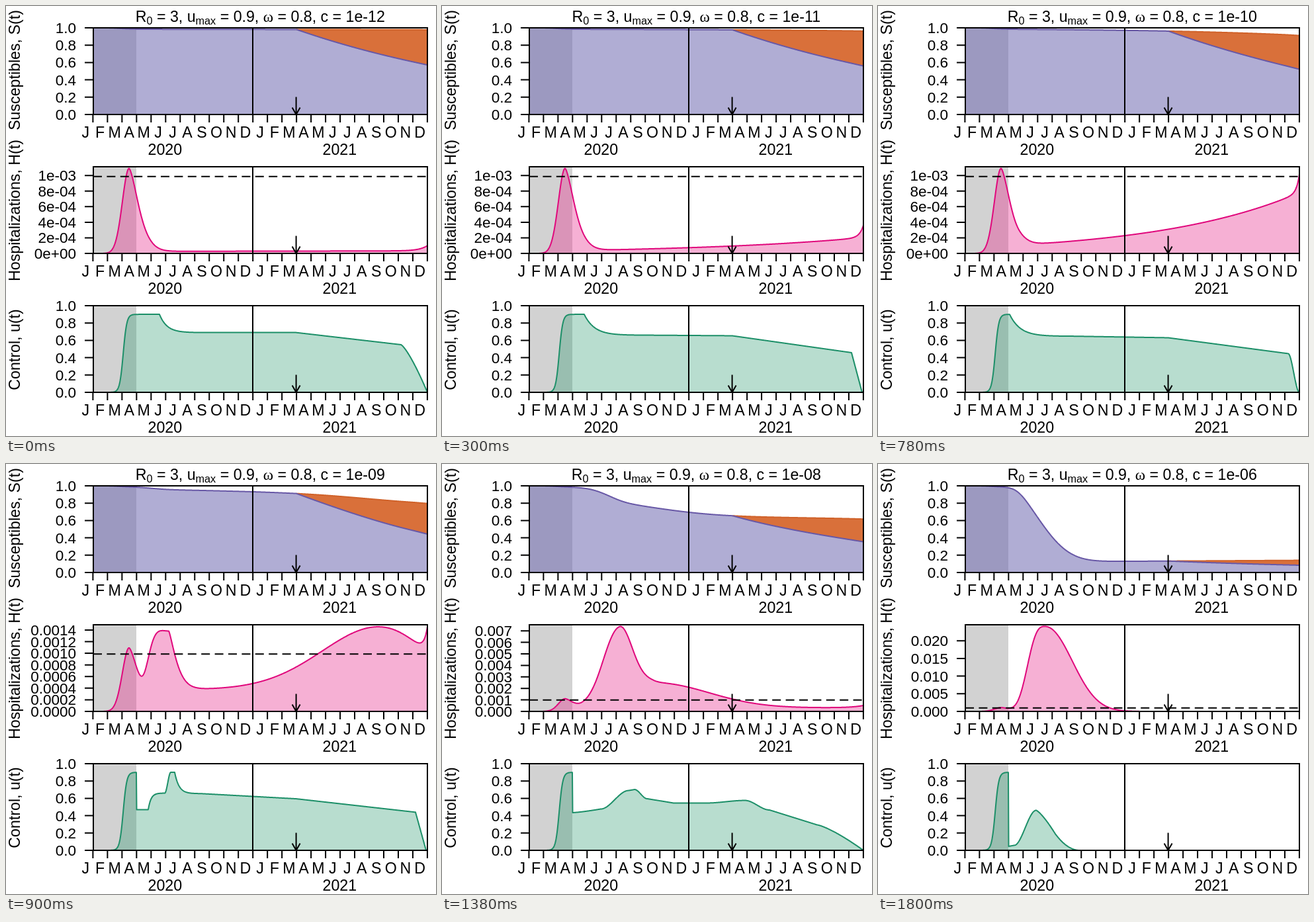
Write an HTML page that moves like this. It is 650 px wide and 650 px high and loops after 2100 ms.

```html
<!DOCTYPE html>
<html lang="en">
<head>
<meta charset="utf-8">
<title>Epidemic control by cost</title>
<style>
  html, body { margin: 0; width: 100%; height: 100%; overflow: hidden; background: #fff; }
  svg { display: block; width: 650px; height: 650px; }
  text { font: 23.2px "Liberation Sans", Arial, sans-serif; text-anchor: middle; }
  .tick { font-size: 22.5px; text-anchor: end; }
  .sub { font-size: 16.2px; }
  .greek { font-family: "Liberation Serif", Times, serif; }
  .ink { fill: none; stroke: #000; stroke-width: 2; }
  .curve { fill: none; stroke-width: 2; stroke-linejoin: round; }
</style>
</head>
<body>
<svg id="stage" viewBox="0 0 650 650"></svg>
<script>
// Time runs along x in stage pixels.
const LEFT = 132, RIGHT = 637, HEIGHT = 131, MONTH = 21.98;
const LOCKDOWN_END = 197, NEW_YEAR = 373, VACCINE = 438.6;
const STEP_MS = 300, DX = 0.5;
const stage = document.getElementById('stage');

// Hospitalizations are in thousandths; unit is the pixels for one thousandth.
// floor and tip: [size, growth length]; bumps: [centre, size, left width, left power, right width, right power].
// control: [x, value, ease from the previous key].
const scenes = [
  { unit: 117.75, step: 0.2, ticks: 6,
    floor: [0.03, 2000], tip: [0.068, 12], bumps: [],
    control: [[232, 0.9], [300, 0.69, 'settle'], [VACCINE, 0.69], [597, 0.55], [637, 0, 'enter']] },
  { unit: 117.75, step: 0.2, ticks: 6,
    floor: [0.095, 260], tip: [0.16, 6], bumps: [],
    control: [[215, 0.9], [308, 0.66, 'settle'], [VACCINE, 0.653], [619, 0.458], [635, 0]] },
  { unit: 117.75, step: 0.2, ticks: 6,
    floor: [0.31, 215], tip: [0.238, 4.4], bumps: [],
    control: [[199, 0.9], [295, 0.648, 'settle'], [VACCINE, 0.63], [620, 0.447], [637, 0, 'smooth']] },
  { unit: 87.9, step: 0.2, ticks: 8,
    floor: [0.375, 1e5], tip: [0.444, 5.5],
    bumps: [[246, 1, 33, 4.4, 15.3, 1.3], [562, 1.08, 122, 1.93, 101, 2.15]],
    control: [[197, 0.9], [197.4, 0.47], [215, 0.47], [240, 0.66, 'settle'], [249, 0.9, 'smooth'], [255, 0.9],
      [294, 0.655, 'settle'], [VACCINE, 0.595], [619, 0.44], [635, 0]] },
  { unit: 17.4, step: 1, ticks: 8,
    floor: [0.316, 1e5], tip: [0.2, 18],
    bumps: [[268, 6.64, 34.2, 2.1, 28, 2], [320, 2.18, 40, 2, 116, 2.05]],
    control: [[197, 0.9], [197.4, 0.435], [240, 0.477, 'enter'], [282, 0.69, 'smooth'], [291, 0.702],
      [310, 0.596, 'smooth'], [350, 0.546], [400, 0.546], [458, 0.576, 'smooth'], [495, 0.466, 'smooth'],
      [567, 0.294], [637, 0, 'enter']] },
  { unit: 9.87, step: 2, ticks: 7,
    floor: [0, 1], tip: [0, 1],
    bumps: [[277, 12.92, 38.3, 2.07, 56, 1.35], [465, 2.08, 110, 2, 90, 1.83]],
    control: [[197, 0.9], [197.4, 0.43], [250, 0.43], [274, 0.55, 'leave'], [294, 0.626, 'enter'],
      [315, 0.496, 'leave'], [345, 0.454, 'enter'], [390, 0.294, 'enter'], [515, 0, 'leave']] },
  { unit: 5.34, step: 5, ticks: 5,
    floor: [0, 1], tip: [0, 1],
    bumps: [[252, 24.06, 30.8, 2.8, 56.8, 2.1]],
    control: [[197, 0.9], [197.4, 0.046], [206, 0.058], [239, 0.462, 'smooth'], [268, 0.19, 'enter'], [305, 0, 'leave']] }
];

const eases = {
  line: t => t,
  enter: t => t ** 1.3,
  leave: t => 1 - (1 - t) ** 2,
  smooth: t => t * t * (3 - 2 * t),
  settle: t => (1 - Math.exp(-6 * t)) / (1 - Math.exp(-6))
};
const logistic = z => 1 / (1 + Math.exp(-z));

function bump(x, [centre, size, wl, pl, wr, pr]) {
  const d = x - centre;
  return size * Math.exp(-(d < 0 ? (-d / wl) ** pl : (d / wr) ** pr));
}

// The first wave is common to all runs.
const firstWave = [186, 1.091, 14.4, 1.95, 20.8, 1.55];

function hospital(x, { floor, tip, bumps }) {
  const base = floor[0] * Math.exp((x - VACCINE) / floor[1]) * logistic((x - 212) / 5);
  const end = tip[0] * Math.exp((x - RIGHT) / tip[1]);
  return [firstWave, ...bumps].reduce((sum, b) => sum + bump(x, b), base + end);
}

function control(x, { control: keys }) {
  const i = keys.findIndex(k => k[0] >= x);
  if (i < 0) return 0;
  if (!i) return 0.9 * logistic((x - 177.2) / 2.7);
  const [x0, v0] = keys[i - 1], [x1, v1, ease = 'line'] = keys[i];
  return v0 + (v1 - v0) * eases[ease]((x - x0) / (x1 - x0));
}

// Infections precede hospital stays; vaccination moves people from s to v.
function population(scene) {
  const infection = 0.00046, lag = 15, waning = 0.00005, vaccination = 0.0027;
  const rows = [];
  let s = 1, v = 0;
  for (let x = LEFT; x <= RIGHT; x += DX) {
    rows.push({ x, s, all: s + v });
    const dose = x < VACCINE ? 0 : vaccination * s;
    const ill = infection * hospital(Math.min(x + lag, RIGHT), scene);
    s += (waning * (1 - s - v) - ill - dose) * DX;
    v += dose * DX;
  }
  return rows;
}

const path = points => 'M' + points.map(([x, y]) => `${x} ${y.toFixed(2)}`).join('L');

function plot(f, base, scale) {
  const points = [];
  for (let x = LEFT; x <= RIGHT; x += DX) points.push([x, base - scale * f(x)]);
  return path(points);
}

const text = (x, y, s, extra = '') => `<text x="${x}" y="${y}" ${extra}>${s}</text>`;
const ink = (d, extra = '') => `<path class="ink" d="${d}" ${extra}/>`;
const line = (d, color) => `<path class="curve" d="${d}" stroke="${color}"/>`;
const area = (d, base, color, alpha) =>
  `<path d="${d}L${RIGHT} ${base}H${LEFT}Z" fill="${color}" fill-opacity="${alpha}"/>`;
const shade = base =>
  `<rect x="${LEFT}" y="${base - HEIGHT}" width="${LOCKDOWN_END - LEFT}" height="${HEIGHT}" fill="#d2d2d2"/>`;

// Box, axes, labels, year divider and arrow of one panel.
function frame(base, name, nameY, { ticks, gap, label }) {
  const top = base - HEIGHT;
  let d = `M${LEFT} ${top}H${RIGHT}V${base}H${LEFT}ZM${NEW_YEAR} ${top}V${base}`;
  d += `M${VACCINE} ${base - 26.5}V${base}m-6 -10.5l6 10.5l6 -10.5`;
  let out = '';
  for (let i = 0; i < 24; i++) {
    const x = LEFT - 0.6 + i * MONTH;
    d += `M${x} ${base}v12`;
    out += text(x - 11.2, base + 35, 'JFMAMJJASOND'[i % 12]);
  }
  for (let i = 0; i < ticks; i++) {
    const y = base - i * gap;
    d += `M${LEFT} ${y}h-13`;
    out += text(106, y + 8, label(i), 'class="tick"');
  }
  out += text(240.3, base + 61, '2020') + text(504.3, base + 61, '2021');
  out += text(0, 0, name, `transform="translate(21 ${nameY}) rotate(-90)"`);
  return ink(d) + out;
}

function title(cost) {
  const sub = s => `<tspan class="sub" dy="4">${s}</tspan><tspan dy="-4"> = </tspan>`;
  return text(384.3, 24, `R${sub('0')}3, u${sub('max')}0.9, <tspan class="greek">ω</tspan> = 0.8, c = ${cost}`);
}

// Exponent form with two digits, such as 2e-04.
const sci = v => v.toExponential(0).replace(/(\d)$/, '0$1');

function draw(scene, index) {
  const { unit, step, ticks } = scene;
  const shareAxis = { ticks: 6, gap: HEIGHT / 5, label: i => (i / 5).toFixed(1) };
  const hospitalAxis = {
    ticks, gap: step * unit,
    label: i => unit > 100 ? sci(i * step / 1000) : (i * step / 1000).toFixed(step < 1 ? 4 : 3)
  };
  const share = v => 164 - HEIGHT * v;
  const rows = population(scene), vaccinated = rows.filter(r => r.x >= VACCINE);
  const s = path(rows.map(r => [r.x, share(r.s)]));
  const v = path(vaccinated.map(r => [r.x, share(r.all)]));
  const wedge = v + path(vaccinated.map(r => [r.x, share(r.s)]).reverse()).replace('M', 'L') + 'Z';
  const h = plot(x => hospital(x, scene), 374, unit);
  const u = plot(x => control(x, scene), 584, HEIGHT);
  stage.innerHTML = title('1e-' + String(12 - index).padStart(2, '0')) +
    shade(164) + area(s, 164, '#7570b3', 0.57) +
    `<path d="${wedge}" fill="#d9703a"/>` + line(v, '#d0622a') + line(s, '#6858a6') +
    frame(164, 'Susceptibles, S(t)', 97, shareAxis) +
    shade(374) + area(h, 374, '#e7298a', 0.37) + line(h, '#e0087c') +
    ink(`M${LEFT} ${374 - 0.988 * unit}H${RIGHT}`, 'stroke-dasharray="13 7.4"') +
    frame(374, 'Hospitalizations, H(t)', 309, hospitalAxis) +
    shade(584) + area(u, 584, '#1c9066', 0.31) + line(u, '#1c8f68') +
    frame(584, 'Control, u(t)', 519.5, shareAxis);
}

let shown = -1;
const begin = performance.now();
function tick() {
  const i = Math.floor((performance.now() - begin) / STEP_MS) % scenes.length;
  if (i !== shown) draw(scenes[i], shown = i);
  requestAnimationFrame(tick);
}
tick();
</script>
</body>
</html>
```
